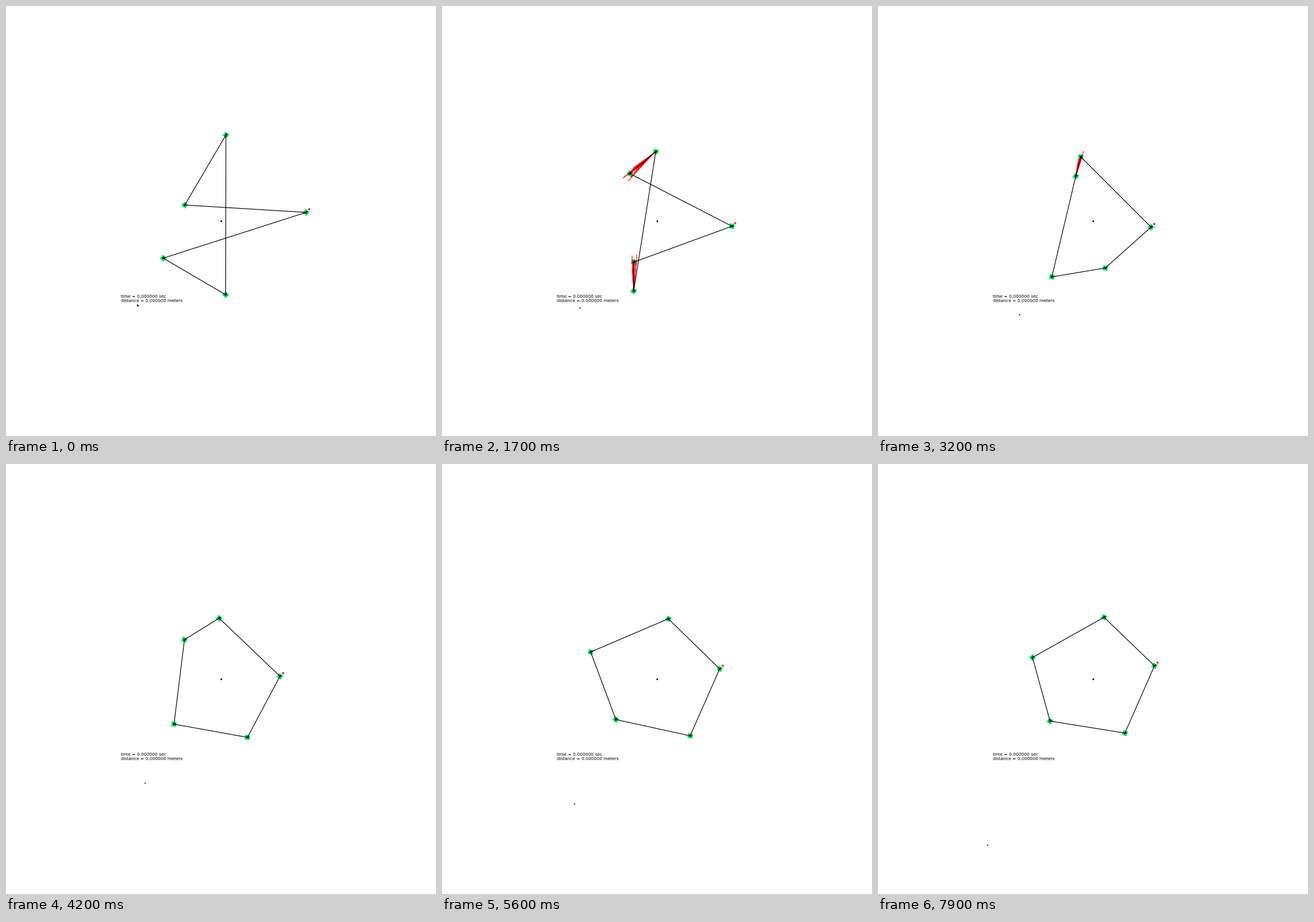
Write a matplotlib script that moves like this. It is 700 by 700 pixels and loops after 8000 ms.

```python
import numpy as np
import matplotlib.pyplot as plt
from matplotlib.animation import FuncAnimation
from matplotlib.collections import LineCollection
from matplotlib.patches import Polygon

SIZE, DPI = 700, 100
FRAMES, STEP = 80, 100
GREEN, RED = "#10df6c", "#ff0000"
NEAR = 60      # distance below which range readings appear
RAYS = 11

KEYS = [0, 1.7, 3.2, 4.2, 5.6, 6.6, 7.9]


class Track:
    """Smooth Hermite curve through a few timed points."""

    def __init__(self, *values, t=KEYS):
        self.t = np.array(t, float)
        self.v = np.array(values, float)
        self.m = np.gradient(self.v, self.t, axis=1)

    def __call__(self, s):
        i = int(np.clip(np.searchsorted(self.t, s) - 1, 0, len(self.t) - 2))
        h = self.t[i + 1] - self.t[i]
        u = (s - self.t[i]) / h
        a, b = self.v[:, i], self.v[:, i + 1]
        p, q = self.m[:, i] * h, self.m[:, i + 1] * h
        return (a * (1 + 2 * u) * (1 - u) ** 2 + p * u * (1 - u) ** 2
                + b * u * u * (3 - 2 * u) + q * u * u * (u - 1))


# Robots in the order of the ring: x, y, heading in degrees
ROBOTS = [
    Track([358, 348, 322, 290.5, 242, 242, 251.5],
          [210, 237, 277, 286, 306, 306.5, 315],
          [45, 8, 30, 15, 15, 38, 50]),
    Track([291, 306, 330, 347, 368.5, 371, 368],
          [324, 273, 245.5, 251, 252, 252, 249.5],
          [45, 28, 10, 40, 30, 28, 30]),
    Track([488.5, 475, 472, 451.5, 444.5, 446, 452, 449.5, 450],
          [336, 349, 358.5, 361.5, 360, 345.5, 333.5, 330.5, 328.5],
          [45, 30, 15, 30, 42, 32, 20, 12, 25],
          t=[0, 0.9, 1.7, 2.7, 3.2, 4.2, 5.6, 6.6, 7.9]),
    Track([256, 312, 370, 393, 404, 399.5, 402],
          [410.5, 417, 426.5, 445, 442.5, 440, 438],
          [45, 8, 10, 6, 15, 20, 25]),
    Track([357.5, 312, 283, 273.5, 283, 288, 280],
          [470, 464, 441, 423.5, 416, 421.5, 418.5],
          [45, 30, 10, 6, 42, 25, 42]),
]
TARGET = Track([213.5, 224, 229.5, 226, 215, 196.5, 177.5],
               [486.5, 491, 502.3, 519, 552.5, 581, 619.5])

BODY = np.array([[-4, -4], [4, -4], [4, 4], [-4, 4]])
HUB = np.array([[-1.6, -1.6], [2.6, -1.2], [2.6, 1.2], [-1.6, 1.6]])
FLAG = np.array([[-2.2, -0.6], [1.9, -2.2], [1.4, 2.2]])

fig = plt.figure(figsize=(SIZE / DPI, SIZE / DPI), dpi=DPI, facecolor="white")
ax = fig.add_axes([0, 0, 1, 1])
ax.set_xlim(0, SIZE)
ax.set_ylim(SIZE, 0)
ax.axis("off")


def shape(points, color, z):
    return ax.add_patch(Polygon(points, closed=True, fc=color, ec="none", zorder=z))


def dot(x, y, px):
    return ax.plot([x], [y], "o", color="black", ms=px * 72 / DPI, mew=0, zorder=6)[0]


def label(y, text):
    ax.text(187, y, text, family="DejaVu Sans", size=5, color="black", va="baseline")


def turn(points, deg):
    c, s = np.cos(np.radians(deg)), np.sin(np.radians(deg))
    return points @ np.array([[c, s], [-s, c]])


label(475, "time = 0.000000 sec")
label(482, "distance = 0.000000 meters")
dot(350.3, 350.3, 2.8)

bodies = [shape(BODY, GREEN, 2) for _ in ROBOTS]
hubs = [shape(HUB, "black", 5) for _ in ROBOTS]
flag = shape(FLAG, "#d01818", 5)
rays = ax.add_collection(LineCollection([], colors=RED, linewidths=0.75, zorder=3))
ring, = ax.plot([], [], color="black", lw=0.8, zorder=4)
target = dot(0, 0, 2)


def fan(rng, a, b):
    """Noisy range readings taken from a towards b."""
    d = b - a
    if np.hypot(*d) > NEAR:
        return []
    lines = []
    for _ in range(RAYS):
        start = a + d * rng.uniform(0, 0.12)
        ray = turn(d, rng.normal(0, 4)) * rng.uniform(0.55, 1.25)
        lines.append([start, start + ray])
    return lines


def draw(n):
    s = n * STEP / 1000
    state = np.array([r(s) for r in ROBOTS])
    pos = state[:, :2]
    for body, hub, p, deg in zip(bodies, hubs, pos, state[:, 2]):
        body.set_xy(p + turn(BODY, deg))
        hub.set_xy(p + turn(HUB, -deg))
    loop = np.vstack([pos, pos[:1]])
    ring.set_data(loop[:, 0], loop[:, 1])
    flag.set_xy(pos[2] + [4.8, -4.9] + FLAG)
    rng = np.random.default_rng(40 + n)
    rays.set_segments(fan(rng, pos[0], pos[1]) + fan(rng, pos[4], pos[3]))
    x, y = TARGET(s)
    target.set_data([x], [y])
    target.set_markersize((3 if n == 0 else 2) * 72 / DPI)
    return []


anim = FuncAnimation(fig, draw, frames=FRAMES, interval=STEP,
                     repeat=True, repeat_delay=0, blit=False)
plt.show()
```
